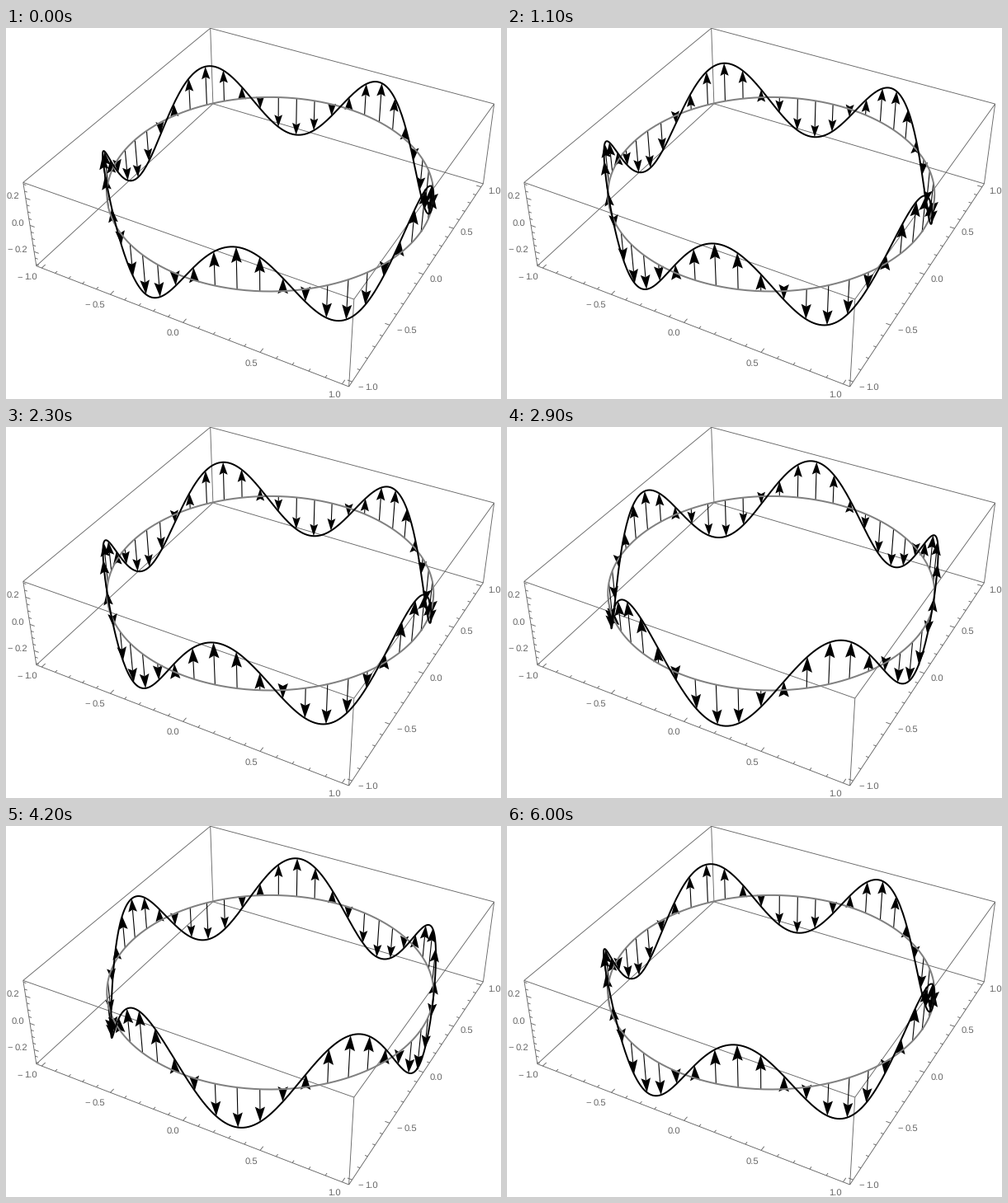
Write a matplotlib script that moves like this. It is 600 px wide and 450 px high and loops after 6.1 s.

```python
import numpy as np
import matplotlib
import matplotlib.pyplot as plt
from matplotlib.animation import FuncAnimation
from matplotlib.collections import LineCollection, PolyCollection

matplotlib.rcParams["font.family"] = "Liberation Sans"
matplotlib.rcParams["text.hinting"] = "none"

W, H, DPI = 600, 450, 100
FRAMES, INTERVAL = 61, 100
PT = 72 / DPI                      # points per pixel

AMP, WAVES, ARROWS = 0.3, 5, 50
STEPS_PER_CYCLE = 12
SIDE, TOP = 1.04, 0.312            # half extents of the box

# Pinhole camera looking at the middle of the box
EYE = np.array([1.3, -2.4, 2.0])
DIST = np.linalg.norm(EYE)
FORWARD = -EYE / DIST
RIGHT = np.cross(FORWARD, [0, 0, 1])
RIGHT /= np.linalg.norm(RIGHT)
UP = np.cross(RIGHT, FORWARD)
ZOOM, CX, CY = 1384.3, 320.3, 188.2

GREY = "0.4"
HEAD = 56                          # arrowhead length in pixels at unit depth
NOTCH = 0.83


def scaled(x, y, z):
    return np.stack(np.broadcast_arrays(x, y, z), axis=-1) / (2 * SIDE)


def depth_of(p):
    return DIST + p @ FORWARD


def project(x, y, z):
    """Map space coordinates to stage pixels."""
    p = scaled(x, y, z)
    depth = depth_of(p)
    return np.stack([CX + ZOOM * (p @ RIGHT) / depth,
                     CY - ZOOM * (p @ UP) / depth], axis=-1)


def height(phi, k):
    return AMP * np.cos(WAVES * phi - 2 * np.pi * k / STEPS_PER_CYCLE)


def ring(phi, z):
    return project(np.cos(phi), np.sin(phi), z)


fig = plt.figure(figsize=(W / DPI, H / DPI), dpi=DPI, facecolor="white")
ax = fig.add_axes([0, 0, 1, 1])
ax.set_xlim(0, W)
ax.set_ylim(H, 0)
ax.axis("off")


def add_lines(segments, color, width, z):
    lines = LineCollection(segments, colors=color, linewidths=width * PT, zorder=z)
    ax.add_collection(lines)
    return lines


def draw_box():
    back, front = [], []
    for axis in range(3):
        for s in (-1, 1):
            for t in (-1, 1):
                ends = np.insert(np.array([[s, t], [s, t]]), axis, [-1, 1], axis=1)
                ends = ends * [SIDE, SIDE, TOP]
                near = np.all(ends[:, 0] > 0) + np.all(ends[:, 1] < 0) + np.all(ends[:, 2] > 0)
                (front if near == 2 else back).append(project(*ends.T))
    add_lines(back, GREY, 0.9, 1)
    add_lines(front, GREY, 0.9, 8)


def draw_ticks():
    ticks = []

    def tick(start, step, major):
        a, b = project(*np.array([start, np.add(start, step)]).T)
        d = (b - a) / np.linalg.norm(b - a)
        ticks.append([a, a + d * (6 if major else 3.5)])

    for i in range(-10, 11):
        v, major = i / 10, i % 5 == 0
        tick((v, -SIDE, -TOP), (0, 0.1, 0), major)
        tick((SIDE, v, -TOP), (-0.1, 0, 0), major)
    for i in range(-6, 7):
        tick((-SIDE, -SIDE, i / 20), (0.1, 0, 0), i % 4 == 0)
    add_lines(ticks, GREY, 0.9, 2)


def label(value, x, y):
    """Number centred on x, y with a slightly detached minus sign."""
    style = dict(fontsize=11.2 * PT, color=GREY, va="baseline", zorder=9)
    text = f"{abs(value):.1f}"
    if value < 0:
        ax.text(x - 13, y + 4, "\u2212", ha="left", **style)
        ax.text(x + 12, y + 4, text, ha="right", **style)
    else:
        ax.text(x, y + 4, text, ha="center", **style)


def draw_labels():
    values = (-1, -0.5, 0, 0.5, 1)
    along_x = [(26, 301), (108.5, 334.5), (202, 368.5), (297, 405.5), (397.5, 443.5)]
    along_y = [(439, 434.5), (486, 365.5), (521, 303.5), (558, 247), (591.5, 196.5)]
    for v, a, b in zip(values, along_x, along_y):
        label(v, *a)
        label(v, *b)
    for v, x, y in ((0.2, 8, 202.5), (0, 14, 235.5), (-0.2, 14.5, 267.5)):
        label(v, x, y)


draw_box()
draw_ticks()
draw_labels()

fine = np.linspace(0, 2 * np.pi, 401)
spots = np.arange(ARROWS) * 2 * np.pi / ARROWS
feet = ring(spots, 0)

shafts = add_lines([], "black", 1.1, 3)
heads = PolyCollection([], facecolors="black", edgecolors="none", zorder=4)
ax.add_collection(heads)
ax.plot(*ring(fine, 0).T, color="0.5", lw=2 * PT, zorder=5)
wave, = ax.plot([], [], color="black", lw=2 * PT, zorder=6)


def update(k):
    wave.set_data(*ring(fine, height(fine, k)).T)
    z = height(spots, k)
    sizes = HEAD / depth_of(scaled(np.cos(spots), np.sin(spots), z))
    lines, shapes = [], []
    for foot, tip, size in zip(feet, ring(spots, z), sizes):
        length = np.linalg.norm(tip - foot)
        if length < 0.5:
            continue
        d = (tip - foot) / length
        side = np.array([-d[1], d[0]]) * size / 3
        notch, rear = tip - NOTCH * size * d, tip - size * d
        if length > NOTCH * size:
            lines.append([foot, notch])
        shapes.append([tip, rear + side, notch, rear - side])
    shafts.set_segments(lines)
    heads.set_verts(shapes)
    return shafts, heads, wave


anim = FuncAnimation(fig, update, frames=FRAMES, interval=INTERVAL,
                     init_func=lambda: update(0), repeat=True, repeat_delay=0)
plt.show()
```
